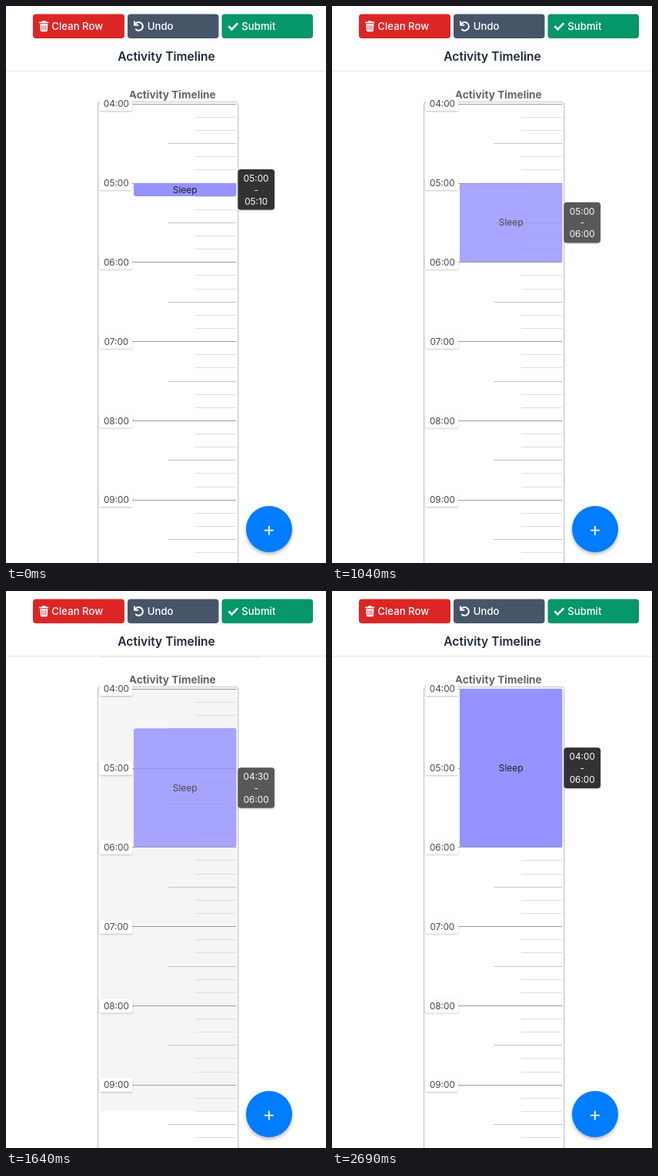
Write an HTML page that moves like this. It is 416x723 px and loops after 2840 ms.

```html
<!DOCTYPE html>
<html lang="en">
<head>
<meta charset="utf-8">
<title>Activity Timeline</title>
<style>
  html, body { margin: 0; width: 100%; height: 100%; overflow: hidden; background: #fff; }
  svg { display: block; width: 100%; height: 100%; font-family: Inter, sans-serif; }
  .btn { font-size: 13.2px; font-weight: 500; fill: #fff; }
  .mid { text-anchor: middle; }
  .small { font-size: 11.8px; }
  .icon { fill: none; stroke: #fff; stroke-width: 2; stroke-linecap: round; stroke-linejoin: round; }
</style>
</head>
<body>
<svg viewBox="0 0 416 723" preserveAspectRatio="xMinYMin meet">
  <defs>
    <filter id="soft" x="-20%" y="-30%" width="140%" height="180%">
      <feDropShadow dx="0" dy="1" stdDeviation="1" flood-opacity=".25"/>
    </filter>
    <filter id="lift" x="-20%" y="-20%" width="140%" height="145%">
      <feDropShadow dx="0" dy="2.5" stdDeviation="2" flood-opacity=".28"/>
    </filter>
  </defs>

  <rect width="416" height="723" fill="#fff"/>
  <g id="marks" fill="#f0f0f2">
    <rect id="markTop" x="123" y="43" width="208" height="1"/>
    <rect id="markHead" y="85" height="1.5"/>
  </g>
  <rect y="84" width="416" height="1" fill="#e5e7eb"/>

  <rect x="35" y="10.5" width="119" height="31.5" rx="4" fill="#dc2626"/>
  <rect x="158" y="10.5" width="118.5" height="31.5" rx="4" fill="#475569"/>
  <rect x="280.5" y="10.5" width="118.5" height="31.5" rx="4" fill="#059669"/>
  <path fill="#fff" d="M43.3 20.6h3.4l.8-1.4h3.4l.8 1.4h3.5v1.7H43.3zM44.2 23.2h10.2l-.6 8.6q-.1 1.4-1.5 1.4h-6q-1.4 0-1.5-1.4z"/>
  <path d="M46.8 25v6.2M49.3 25v6.2M51.8 25v6.2" stroke="#dc2626" stroke-width=".9"/>
  <path class="icon" d="M167 20.3v4.4h4.4M167.6 24.2a5.4 5.4 0 1 1 1.3 6.3"/>
  <path class="icon" stroke-width="2.6" style="stroke-width:2.6;stroke-linecap:butt;stroke-linejoin:miter" d="M289.4 26.2l4 4.1 7.8-8"/>
  <g class="btn">
    <text x="59.3" y="31">Clean Row</text>
    <text x="183.7" y="31">Undo</text>
    <text x="306.3" y="31">Submit</text>
  </g>
  <text class="mid" x="208.5" y="70.6" font-size="15.6" font-weight="600" fill="#1e293b">Activity Timeline</text>
  <text class="mid" x="216.3" y="119.8" font-size="13.7" font-weight="700" fill="#666">Activity Timeline</text>

  <rect x="119.5" y="124.5" width="182.3" height="640" rx="4" fill="#fff" stroke="#d2d2d2" stroke-width="1.7"/>
  <rect id="shade" y="126" fill="#f5f5f7"/>
  <g id="lines"></g>
  <g id="labels"></g>

  <g id="entry">
    <rect id="block" x="166" width="133.5" rx="3.5" fill="#9692ff"/>
    <text id="name" class="mid" x="232.7" font-size="12" fill="#222">Sleep</text>
    <g id="tip">
      <rect x="301.5" y="-26.3" width="47.6" height="52.6" rx="4" fill="#333" filter="url(#soft)"/>
      <g class="mid small" fill="#fff">
        <text id="from" x="325.2" y="-10.6"></text>
        <text x="325.2" y="4.3">-</text>
        <text id="to" x="325.2" y="19.2"></text>
      </g>
    </g>
  </g>

  <circle cx="342" cy="679" r="30" fill="#007bff" filter="url(#lift)"/>
  <path d="M335.9 680.7h12M341.9 674.7v12" stroke="#fff" stroke-width="1.8"/>
</svg>
<script>
const LOOP = 2840, TOP = 127.2, HOUR = 102.8, START = 240;
const $ = id => document.getElementById(id);
const set = (el, attrs) => { for (const k in attrs) el.setAttribute(k, attrs[k]); };
const add = (parent, tag, attrs, text = '') => {
  const el = document.createElementNS('http://www.w3.org/2000/svg', tag);
  set(el, attrs);
  el.textContent = text;
  parent.append(el);
};
const yOf = min => TOP + (min - START) / 60 * HOUR;
const clock = min => [Math.floor(min / 60), min % 60].map(n => String(n).padStart(2, '0')).join(':');

for (let m = START; m < START + 350; m += 10) {
  const [x, fill] = m % 60 === 0 ? [164, '#9c9c9c'] : m % 30 === 0 ? [210.5, '#c4c4c4'] : [246, '#dedede'];
  add($('lines'), 'rect', { x, y: Math.round(yOf(m) - .5), width: 299.3 - x, height: 1, fill });
  if (m % 60 === 0) {
    const y = yOf(m);
    add($('labels'), 'rect', { x: 121.5, y: y - 9.2, width: 42.7, height: 18, rx: 2, fill: '#fff', filter: 'url(#soft)' });
    add($('labels'), 'text', { x: 143.4, y: y + 4.1, class: 'mid small', fill: '#444' }, clock(m));
  }
}

// time, first minute, last minute, being dragged
const steps = [
  [0, 300, 310, false], [300, 300, 310, true], [440, 300, 330, true],
  [590, 300, 360, true], [740, 300, 350, true], [890, 300, 360, true],
  [1190, 300, 360, false], [1490, 300, 360, true], [1640, 270, 360, true],
  [1790, 250, 360, true], [1940, 240, 360, true], [2090, 240, 360, false]
];

function draw(t) {
  const [, from, to, drag] = steps.filter(s => s[0] <= t).pop();
  const y = yOf(from) + (from === START ? -.5 : 2 - 2 - .3), end = yOf(to) - .2, mid = (y + end) / 2;
  set($('block'), { y, height: end - y });
  set($('name'), { y: mid + 4.3 });
  set($('tip'), { transform: `translate(0 ${mid})` });
  set($('entry'), { opacity: drag ? .81 : 1 });
  $('from').textContent = clock(from);
  $('to').textContent = clock(to);

  const pressed = t >= 1340 && t < 2240, moved = t >= 1790;
  const x = moved ? 163.5 : 123;
  set($('shade'), { x, width: 300.5 - x, height: (moved ? 698 : 675) - 126, visibility: pressed ? 'visible' : 'hidden' });
  set($('marks'), { visibility: pressed ? 'visible' : 'hidden' });
  set($('markTop'), { opacity: moved ? 0 : 1 });
  set($('markHead'), { x, width: moved ? 201 : 208 });
}

function tick() {
  draw(performance.now() % LOOP);
  requestAnimationFrame(tick);
}
tick();
</script>
</body>
</html>
```
